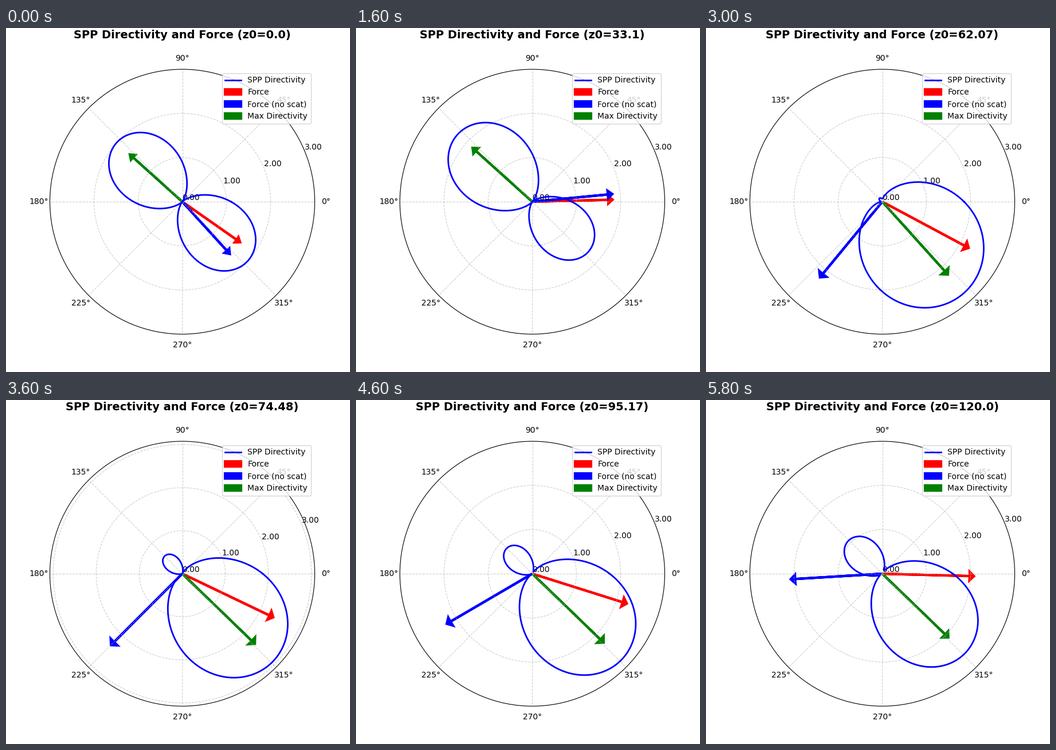
Write a matplotlib script that moves like this. It is 600x600 px and loops after 6000 ms.

```python
import numpy as np
import matplotlib.pyplot as plt
from matplotlib.animation import FuncAnimation

FRAMES, INTERVAL = 30, 200
heights = np.linspace(0, 120, FRAMES)
theta = np.linspace(0, 2 * np.pi, 361)


def rise(i, center, width):
    return 1 / (1 + np.exp((center - i) / width))


def blend(before, after, s):
    return before + (after - before) * s


def force_angle(i):
    before = 2 - 37 * (1 - i / 9) ** 2
    after = -29 + .095 * (i - 12) ** 2
    return np.radians(blend(before, after, rise(i, 10.5, .45)))


def free_angle(i):
    before = -47.7 + 3.36 * i
    after = 234 - .14 * (i - 10) ** 2
    return np.radians(blend(before, after, rise(i, 9.08, .5)))


def along(deg):
    return np.cos(theta - np.radians(deg))


def directivity(i):
    """Interference of a vertical and an in-plane dipole, with mean 1."""
    mix = 2.715 * rise(i, 12.62, 1.2) + .00025 * i ** 2
    a, b = np.sin(mix), np.cos(mix)
    lag = max(0, heights[i] - 50) / 350
    real = a + b * along(138) + a * (.05 + .15 * a * a) * along(228)
    imag = .374 * a * along(129) + lag * along(48)
    power = real ** 2 + imag ** 2
    return power / power[:-1].mean()


def arrow(angle, length, color, label):
    ax.arrow(angle, 0, 0, length, head_width=.1, head_length=.1,
             length_includes_head=True, lw=3, color=color, label=label)


def update(i):
    ax.clear()
    d = directivity(i)
    peak = d.max()
    size = .8 * peak
    ax.plot(theta, d, color="blue", lw=2, label="SPP Directivity")
    arrow(force_angle(i), size, "red", "Force")
    arrow(free_angle(i), size, "blue", "Force (no scat)")
    arrow(theta[d.argmax()], size, "green", "Max Directivity")

    ax.set_yticks([0, 1, 2, 3])
    ax.yaxis.set_major_formatter("{x:.2f}")
    ax.set_ylim(0, max(3, peak + .05 * (peak - d.min())))
    ax.grid(True, linestyle="--", alpha=.6)
    ax.legend(loc="upper right")
    ax.set_title(f"SPP Directivity and Force (z0={round(heights[i], 2)})",
                 fontsize=14, fontweight="bold", pad=20)


fig, ax = plt.subplots(figsize=(6, 6), dpi=100,
                       subplot_kw={"projection": "polar"})
anim = FuncAnimation(fig, update, frames=FRAMES, interval=INTERVAL,
                     init_func=lambda: None, repeat=True, repeat_delay=0)
plt.show()
```
